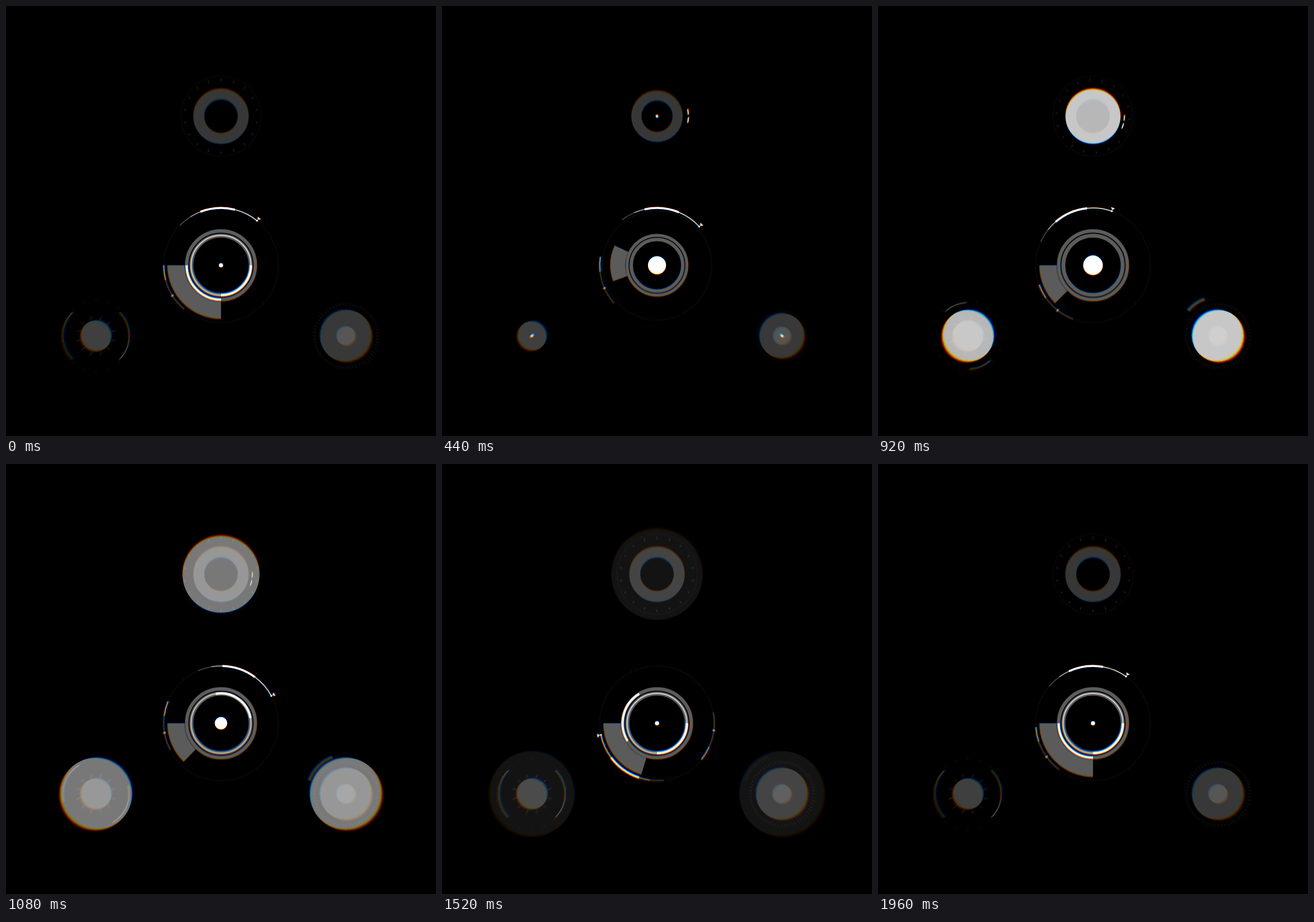
Animation of 720x720 px, one loop 2 s. Source, as an HTML page with a canvas:

```html
<!DOCTYPE html>
<html lang="en">
<head>
<meta charset="utf-8">
<title>Orbital dials</title>
<style>
html, body { margin: 0; width: 100%; height: 100%; overflow: hidden; background: #000; }
canvas { display: block; width: 720px; height: 720px; }
</style>
</head>
<body>
<canvas id="stage" width="720" height="720"></canvas>
<script>
const SIZE = 720, MID = SIZE / 2, LOOP = 2000, STEP = 40;
const SAMPLES = 7, SPREAD = 0.0042;
const stage = document.getElementById('stage').getContext('2d');
const buffer = document.createElement('canvas');
buffer.width = buffer.height = SIZE;
const g = buffer.getContext('2d');

const rad = deg => deg * Math.PI / 180;
const white = alpha => `rgba(255,255,255,${Math.max(0, alpha)})`;

// Timing helpers: each goes from 0 to 1 between two times.
const ramp = (t, from, to) => Math.min(1, Math.max(0, (t - from) / (to - from)));
const swing = (t, from, to) => (1 - Math.cos(Math.PI * ramp(t, from, to))) / 2;
const settle = (t, from, to) => 1 - (1 - ramp(t, from, to)) ** 3;
const bump = (t, a, b, c, d) => swing(t, a, b) - swing(t, c, d);

function disc(r, alpha) {
  g.fillStyle = white(alpha);
  g.beginPath();
  g.arc(0, 0, r, 0, 7);
  g.fill();
}

function arc(r, from, to, width, alpha) {
  g.strokeStyle = white(alpha);
  g.lineWidth = width;
  g.beginPath();
  g.arc(0, 0, r, rad(from), rad(to));
  g.stroke();
}

const ring = (inner, outer, alpha) => arc((inner + outer) / 2, 0, 360, outer - inner, alpha);

function ticks(count, r, length, turn, alpha) {
  g.strokeStyle = white(alpha);
  g.lineWidth = 1;
  g.beginPath();
  for (let i = 0; i < count; i++) {
    const a = rad(turn - 90 + i * 360 / count), c = Math.cos(a), s = Math.sin(a);
    g.moveTo((r - length / 2) * c, (r - length / 2) * s);
    g.lineTo((r + length / 2) * c, (r + length / 2) * s);
  }
  g.stroke();
}

function polygon(points, alpha) {
  g.fillStyle = white(alpha);
  g.beginPath();
  for (const [x, y] of points) g.lineTo(x, y);
  g.fill();
}

function place(x, y, draw, turn = 0) {
  g.save();
  g.translate(x, y);
  g.rotate(rad(turn));
  draw();
  g.restore();
}

const turned = (deg, draw) => place(0, 0, draw, deg);
const squeezeAt = t => bump(t, 80, 440, 440, 740);
const detailAt = t => 1 - bump(t, 0, 360, 520, 800);
const tickTurnAt = t => -30 * bump(t, 0, 440, 440, 1100);

function drawDial(t) {
  const squeeze = squeezeAt(t), k = 1 - 0.13 * squeeze, orbit = 95.8;
  ticks(150, orbit * (1 - 0.047 * squeeze), 1, 0, 0.23);

  g.save();
  g.scale(k, k);
  const wedgeEnd = 90 + 70 * swing(t, 80, 440) - 25 * swing(t, 440, 760) - 45 * swing(t, 1000, 1900);
  arc(75.3, wedgeEnd, 180 + 25 * squeeze, 29, 0.35);
  ring(54.5, 60.3, 0.36);
  ring(46.3, 52.8, 0.36);

  // Both bright quarters spin in, stay over the loop's end and fade.
  const fade = 1 - swing(t, 0, 320), inlay = fade + swing(t, 980, 1110);
  const fresh = t > LOOP / 4 ? 1 : 0;
  const inner = -180 * fresh * (1 - settle(t, 1000, 1450));
  const outer = 180 * fresh * (1 - settle(t, 1380, 1830));
  arc(50, 0, 360, 2, 0.7 * inlay);
  arc(50, inner, inner + 90, 4, inlay);
  arc(57.5, outer + 90, outer + 180, 3.6, fade + swing(t, 1380, 1460));
  g.restore();

  const heading = -51 + 8.5 * swing(t, 40, 440) - 42.5 * swing(t, 440, 760) + 394 * swing(t, 765, 2040);
  turned(heading, () => {
    arc(orbit, -85, -71, 1, 0.4);
    arc(orbit, -71, -59, 1.4, 0.7);
    arc(orbit, -60, -25, 3.4, 1);
    arc(orbit, -25, 0, 1.5, 0.9);
    place(orbit, 0, () => {
      disc(1.6, 1);
      polygon([[2, 0], [6, -3.5], [6, 3.5]], 1);
    });
  });
  turned(heading + 199, () => {
    arc(orbit, -18, 0, 1.5, 0.3);
    arc(orbit, 0, 17, 1, 0.4);
    arc(orbit, 17, 32, 2, 0.6);
    place(orbit, 0, () => polygon([[-3, 0], [0, -2.3], [3, 0], [0, 2.3]], 0.5));
  });
  disc(3.5 + 15.5 * bump(t, 120, 600, 760, 1360), 1);
}

// White dot that bursts into a wide, fading disc.
function drawPulse(t, reach) {
  if (t < 420) return;
  const r = 14.5 * settle(t, 420, 760) + reach * settle(t, 760, 1520);
  disc(r, (1 - ramp(t, 760, 1780)) ** 2);
}

function drawTop(t) {
  const k = 1 - 0.07 * squeezeAt(t), detail = detailAt(t);
  ring(28 * k, 46.3 * k, 0.21);
  ticks(18, 57 + 4 * detail, 4, tickTurnAt(t), 0.22 * detail);
  ticks(120, 63 + 4 * detail, 1, 0, 0.16 * detail);
  const dash = swing(t, 300, 420) * (1 - swing(t, 800, 1500));
  turned(11 * bump(t, 440, 760, 1000, 1300), () => {
    arc(52.5, -13, -3, 1.8, dash);
    arc(52.5, 2, 12, 1.8, dash);
  });
  drawPulse(t, 62);
}

function drawLeft(t) {
  const detail = detailAt(t), turn = tickTurnAt(t);
  disc(26 - 1.2 * squeezeAt(t), 0.24);
  ticks(12, 27.5 + 3 * detail, 6, 15 + turn, 0.22 * detail);
  ticks(18, 59, 4, turn, 0.08 * detail);
  const fresh = t > LOOP / 4;
  const half = 45 * (fresh ? swing(t, 640, 1240) : 1);
  const spin = fresh ? 90 * (1 - swing(t, 760, 1240)) : 0;
  const alpha = 0.28 * (1 - swing(t, 0, 320) + swing(t, 680, 800));
  for (const side of [0, 180]) turned(side + spin, () => arc(55.5, -half, half, 1.8, alpha));
  drawPulse(t, 57);
}

function drawRight(t) {
  const squeeze = squeezeAt(t);
  disc(43.7 - 5.7 * squeeze, 0.215);
  disc(16 - squeeze, 0.15);
  ticks(60, 53 - 12 * squeeze, 4, tickTurnAt(t), 0.05 + 0.08 * detailAt(t));
  const band = 0.28 * swing(t, 680, 760) * (1 - swing(t, 760, 1700));
  arc(65.5, 240 - 40 * swing(t, 760, 1080), 250, 5, band);
  drawPulse(t, 57);
}

// Lens dispersion: red is spread outwards and blue inwards around the centre.
function tintOf(sample) {
  const weight = peak => Math.round(255 * Math.max(0, 1 - Math.abs(sample - peak) / 2) / 2);
  return `rgb(${weight(1)},${weight(3)},${weight(5)})`;
}

function render(t) {
  stage.globalCompositeOperation = 'source-over';
  stage.fillStyle = '#000';
  stage.fillRect(0, 0, SIZE, SIZE);
  stage.globalCompositeOperation = 'lighter';
  for (let i = 0; i < SAMPLES; i++) {
    const scale = 1 + SPREAD * ((SAMPLES - 1) / 2 - i);
    g.fillStyle = '#000';
    g.fillRect(0, 0, SIZE, SIZE);
    g.save();
    g.translate(MID, MID);
    g.scale(scale, scale);
    g.translate(-MID, -MID);
    place(360, 434, () => drawDial(t));
    place(360, 184.8, () => drawTop(t));
    place(151, 552, () => drawLeft(t));
    place(569, 552, () => drawRight(t));
    g.restore();
    g.globalCompositeOperation = 'multiply';
    g.fillStyle = tintOf(i);
    g.fillRect(0, 0, SIZE, SIZE);
    g.globalCompositeOperation = 'source-over';
    stage.drawImage(buffer, 0, 0);
  }
}

const begin = performance.now();
let shown = -1;
function tick() {
  const t = Math.floor((performance.now() - begin) % LOOP / STEP) * STEP;
  if (t !== shown) render(shown = t);
  requestAnimationFrame(tick);
}
tick();
</script>
</body>
</html>
```
